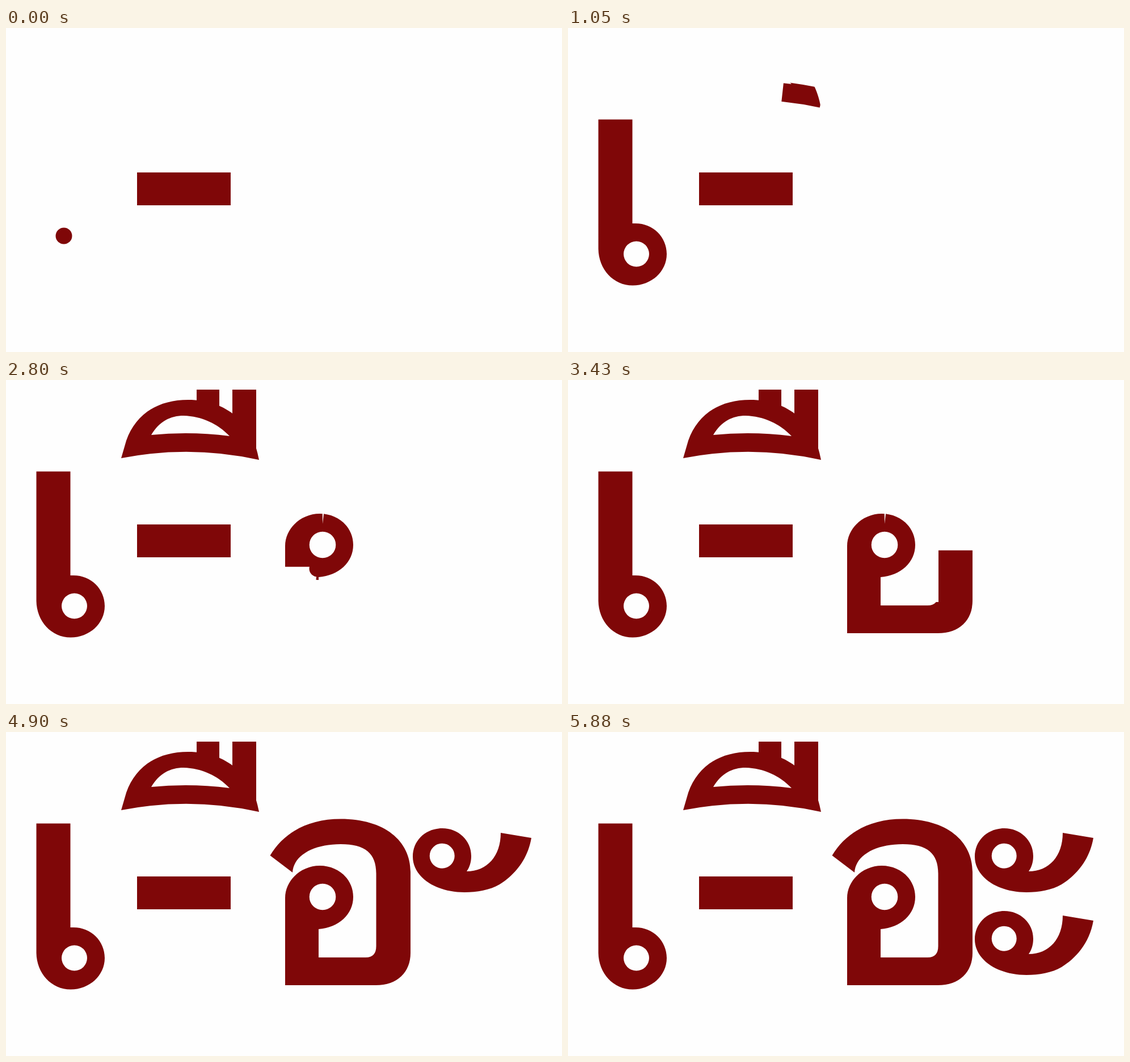
An HTML page that plays this animation: 980x572 px, repeating every 6.72 s.

```html
<!DOCTYPE html>
<html lang="th">
<head>
<meta charset="utf-8">
<title>Stroke order</title>
<style>
  html, body { margin: 0; width: 100%; height: 100%; overflow: hidden; background: #fefefe; }
  svg { display: block; width: 100%; height: 100%; }
</style>
</head>
<body>
<svg id="stage" viewBox="0 0 980 572" fill="#7f0708">
  <rect x="231" y="255" width="165" height="58"/>
</svg>
<script>
const LOOP = 6720, STEP = 70;
const stage = document.getElementById('stage');

function add(parent, tag, attrs) {
  const el = document.createElementNS('http://www.w3.org/2000/svg', tag);
  for (const name in attrs) el.setAttribute(name, attrs[name]);
  return parent.appendChild(el);
}

const circle = (x, y, r) => `M${x - r} ${y}a${r} ${r} 0 1 0 ${2 * r} 0a${r} ${r} 0 1 0 ${-2 * r} 0Z`;

const swirl = {
  shape: 'M872 178L926 187C919 228 894 254 870 269C853 279 830 283 808 283' +
    'C757 283 717 256 717 220C717 191 740 170 769 170C797 170 820 191 820 219' +
    'C820 230 817 239 812 246C848 246 872 219 872 178Z' + circle(768.7, 218.7, 22),
  dot: [791, 246.5],
  pen: [
    [32, 'M791 247A37 37 0 1 0 732 218'],
    [60, 'M732 218C732 245 765 264 806 264C860 264 893 232 899 180']
  ],
  keys: [[3990, 10], [4060, 40], [4410, 198], [4900, 380]]
};

// pen: [width, path] pieces drawn in turn; keys: [time, distance travelled]
const strokes = [
  {
    shape: 'M53.5 161.5H113.5V345H119C150 345 174 369 174 399C174 430 147 454.5 114 454.5' +
      'C80 454.5 54 426 53.5 390Z' + circle(120.5, 399, 22.5),
    dot: [102, 367],
    pen: [
      [40, 'M102 367A37 37 0 1 1 120 436'],
      [62, 'M120 436A37 37 0 0 1 83.5 399V160']
    ],
    keys: [[0, 0], [700, 355], [840, 440]]
  },
  {
    shape: 'M203 138L212 107C229 59 269 35 321 35C389 35 435 76 446 141Q325 114 203 138Z' +
      'M256 97C270 73 290 63 313 63C345 64 373 77 394 99Q325 90 256 97Z',
    pen: [
      [38, 'M447 126Q325 98 203 121'],
      [52, 'M203 142C228 72 268 49 318 49C375 49 412 82 436 130']
    ],
    keys: [[980, 35], [1050, 70], [1610, 398], [1820, 555]]
  },
  {
    shape: 'M336 17H376V58H336Z',
    pen: [[44, 'M356 16V60']],
    keys: [[1890, 15], [1960, 44]]
  },
  {
    shape: 'M399 17H441V121H399Z',
    pen: [[46, 'M420 16V122']],
    keys: [[2030, 27], [2240, 106]]
  },
  {
    shape: 'M465.5 218C490 177 533 153.5 590 153.5C667 153.5 713 192 713 247V390' +
      'C713 424 690 447 652 447H492V293C492 262 520 236 553 236C586 236 612 260 612 291' +
      'C612 322 587 345 551 348V398H634Q652.5 398 652.5 378V250C652.5 214 633 198 590 198' +
      'C543 198 507 217 505 248Z' + circle(558, 291, 23.3),
    dot: [549, 333],
    pen: [
      [44, 'M549 331A38 38 0 0 0 558 254'],
      [60, 'M558 254A37 37 0 0 0 521.5 291V422H655A28 28 0 0 0 683 394V245' +
        'C683 200 645 176 590 176C540 176 508 200 483 236']
    ],
    keys: [[2310, 15], [2800, 218], [3010, 316], [3920, 890]]
  },
  swirl,
  { ...swirl, shift: 146, keys: swirl.keys.map(([t, d]) => [t + 980, d]) }
];

strokes.forEach((s, i) => {
  const mask = add(stage, 'mask', {
    id: 'pen' + i, maskUnits: 'userSpaceOnUse', x: 0, y: 0, width: 980, height: 572
  });
  if (s.dot) add(mask, 'circle', { cx: s.dot[0], cy: s.dot[1], r: 14.5, fill: '#fff' });
  s.parts = s.pen.map(([width, d]) => {
    const el = add(mask, 'path', { d, fill: 'none', stroke: '#fff', 'stroke-width': width });
    return { el, length: el.getTotalLength() };
  });
  s.el = add(stage, 'path', {
    d: s.shape, 'fill-rule': 'evenodd', transform: `translate(0 ${s.shift || 0})`
  });
});

function distance(keys, t) {
  const i = keys.findIndex(k => k[0] > t);
  const [t0, d0] = keys[i - 1], [t1, d1] = keys[i];
  return d0 + (d1 - d0) * (t - t0) / (t1 - t0);
}

function draw(t) {
  strokes.forEach((s, i) => {
    const started = t >= s.keys[0][0];
    const done = t >= s.keys[s.keys.length - 1][0];
    s.el.setAttribute('display', started ? 'inline' : 'none');
    s.el.setAttribute('mask', done ? 'none' : `url(#pen${i})`);
    if (!started || done) return;
    let left = distance(s.keys, t);
    for (const { el, length } of s.parts) {
      el.setAttribute('display', left > 0 ? 'inline' : 'none');
      el.setAttribute('stroke-dasharray', left >= length ? 'none' : `${Math.max(left, 0)} 9999`);
      left -= length;
    }
  });
}

const start = performance.now();
function tick() {
  const t = (performance.now() - start) % LOOP;
  draw(Math.floor(t / STEP) * STEP);
  requestAnimationFrame(tick);
}
tick();
</script>
</body>
</html>
```
